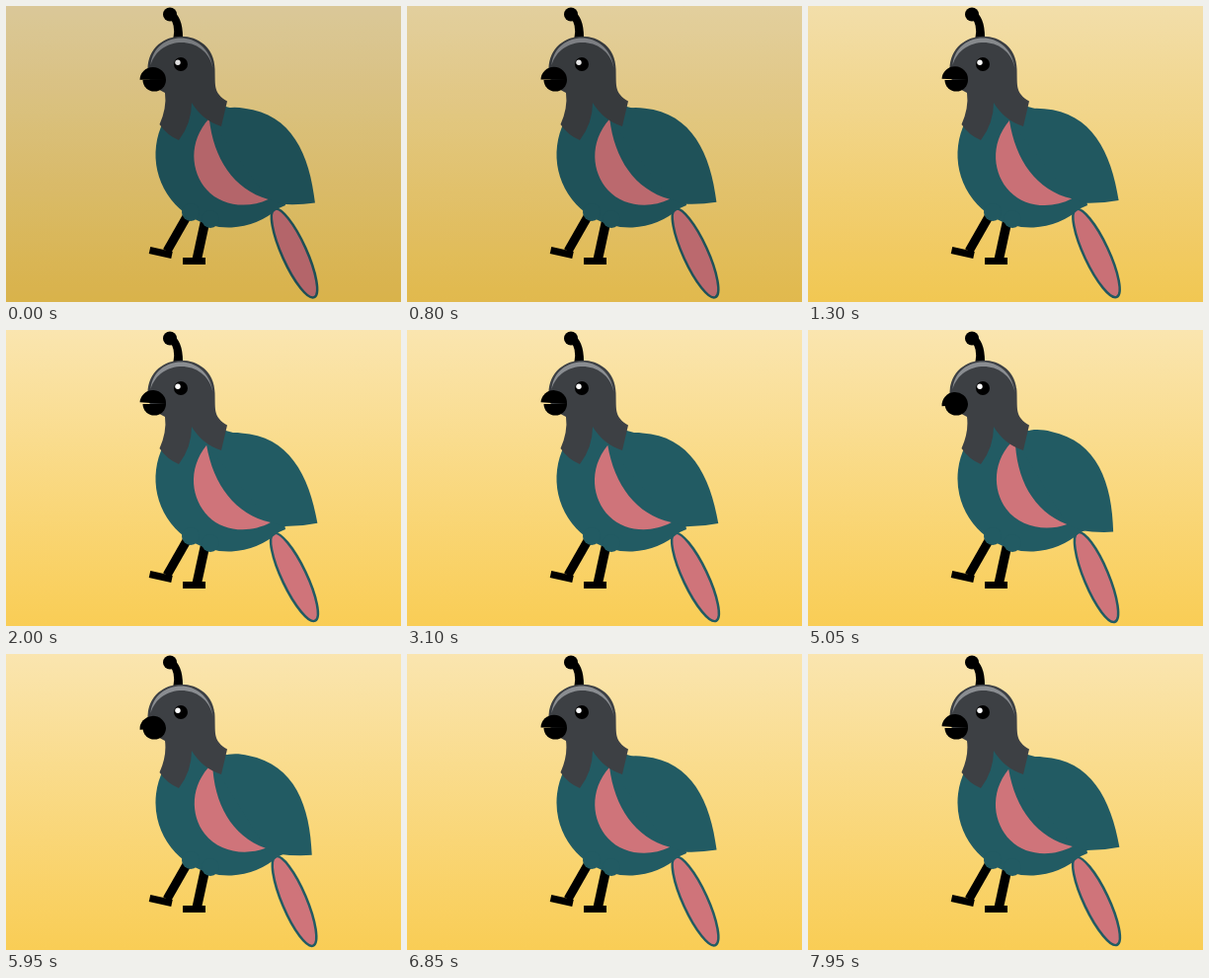
These frames come from a looping animation (400 px wide and 300 px high, 8 s). An HTML page:

```html
<!DOCTYPE html>
<html lang="en">
<head>
<meta charset="utf-8">
<title>Quail</title>
<style>
  html, body { margin: 0; width: 100%; height: 100%; overflow: hidden; }
  svg { display: block; width: 100vw; height: 100vh; }
  .teal { fill: #225b63; }
  .pink { fill: #cf747a; }
  .leg { fill: none; stroke: #000; }
</style>
</head>
<body>
<svg viewBox="0 0 400 300">
  <defs>
    <linearGradient id="sky" x2="0" y2="1">
      <stop stop-color="#fae5af"/>
      <stop offset="1" stop-color="#f9cd55"/>
    </linearGradient>
  </defs>
  <rect width="400" height="300" fill="url(#sky)"/>

  <g class="leg">
    <path d="M185 210L163 248.500" stroke-width="9"/>
    <path d="M145.500 247.500L168 252.500" stroke-width="7"/>
    <path d="M201.500 219L193 258" stroke-width="9.500"/>
    <path d="M179 258.500H202" stroke-width="7"/>
  </g>

  <g id="tail">
    <ellipse class="pink" cx="292" cy="250.500" rx="12.500" ry="49" transform="rotate(-25.500 292 250.500)" stroke="#225b63" stroke-width="2.500"/>
  </g>

  <g class="teal">
    <path d="M159.500 117A74 74 0 0 0 275 205.500L283 202L270 130L230 104L186 92Z"/>
    <circle cx="187" cy="209" r="9"/>
    <circle cx="207" cy="216" r="9"/>
  </g>

  <g id="wing">
    <path class="teal" d="M203 117C210 106 224 103 238 104.500C286 107 307 147 315.500 195.500Q299 199 282 199L268 195Z"/>
    <path class="pink" d="M203 117C183 142 188 172 205 189C221 205 248 206 268 195C232 187 210 157 203 117Z"/>
  </g>

  <path d="M168 5Q179 10 179 32H169.500Q172 18 165 12Z"/>
  <circle cx="166" cy="8.500" r="7"/>
  <path fill="#3d4044" d="M143.500 64C144 19.500 211 19.500 211.500 64C212 82 210 88 224 96.500L218 122Q199 116 188 98Q188 119 175 136Q163 131 155.500 120Q163 103 161 88C149 82 143.500 76 143.500 64Z"/>
  <path fill="#8a8d91" d="M146.500 60C150 24 204 22 209.500 63C202.500 29 155.500 29 146.500 60Z"/>
  <circle cx="177" cy="59" r="7"/>
  <circle cx="174" cy="57.200" r="2.700" fill="#fff"/>

  <path d="M138.500 75H162A11.700 11.500 0 0 1 138.500 75Z"/>
  <path id="beak" d="M135.500 75A13.200 13 0 0 1 162 75Z"/>

  <rect id="shade" width="400" height="300"/>
</svg>
<script>
const LOOP = 8000, HALF = 3000, PEAK = 2450;
const get = id => document.getElementById(id);
const clamp = x => Math.min(1, Math.max(0, x));
const smooth = x => x * x * (3 - 2 * x);
const turn = (id, angle, x, y) =>
  get(id).setAttribute('transform', `rotate(${angle} ${x} ${y})`);

// 0 = wing raised and beak open, 1 = wing lowered and beak closed
function pose(t) {
  if (t < 800) t = 650 + 150 * clamp((t - 350) / 450);
  const away = Math.abs(t - PEAK) % (2 * HALF);
  return (Math.min(away, 2 * HALF - away) / HALF) ** 2.3;
}

function draw(now) {
  const t = now % LOOP, p = pose(t);
  turn('wing', 12 * p, 252, 158);
  turn('tail', 4 * p, 292, 251);
  turn('beak', 4 - 12 * p, 162, 75);
  get('shade').setAttribute('opacity', 0.13 * (1 - smooth(clamp((t - 350) / 1400))));
}

const start = performance.now();
function tick() {
  draw(performance.now() - start);
  requestAnimationFrame(tick);
}
tick();
</script>
</body>
</html>
```
